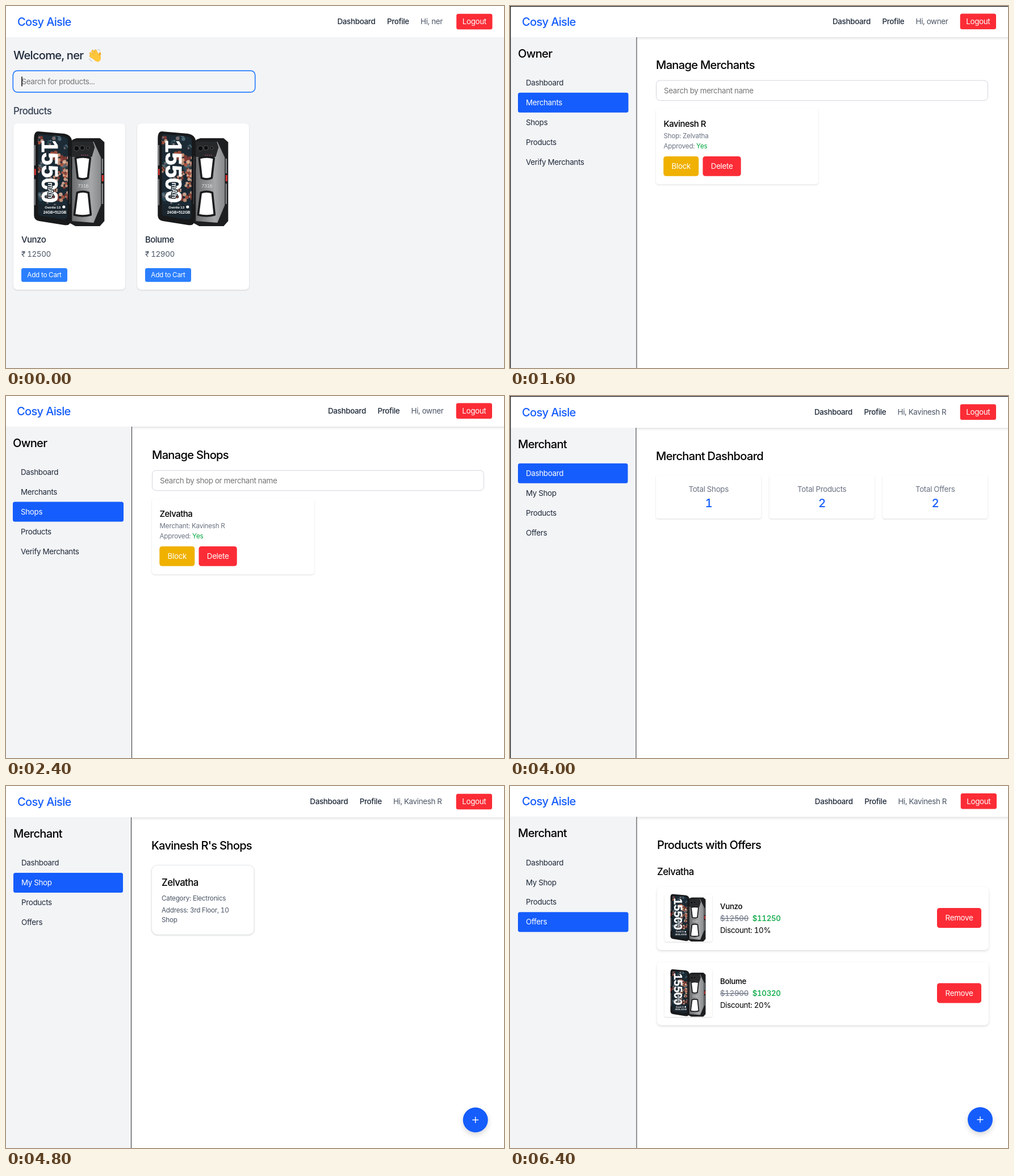
These frames come from a looping animation (877 px wide and 638 px high, 7200 ms). An HTML page:

```html
<!DOCTYPE html>
<html lang="en">
<head>
<meta charset="utf-8">
<title>Shop walkthrough</title>
<style>
  html, body { margin: 0; width: 100%; height: 100%; overflow: hidden; background: #fff; }
  svg { display: block; width: 877px; height: 638px; }
  text { font-family: Inter, system-ui; font-optical-sizing: none; font-variant-numeric: tabular-nums; white-space: pre; }
  .low { filter: drop-shadow(0 1px 1.2px rgba(0, 0, 0, .14)); }
  .mid { filter: drop-shadow(0 2px 2px rgba(0, 0, 0, .13)); }
  .high { filter: drop-shadow(0 4px 5px rgba(0, 0, 0, .16)); }
  .print { font-family: Arial, system-ui; font-weight: 700; fill: #fff; }
</style>
</head>
<body>
<svg id="stage" viewBox="0 0 877 638"></svg>
<script>
const HOLD = 800;
const BRAND = 'Cosy Aisle', SHOP = 'Zelvatha', SELLER = 'Kavinesh R';
const GOODS = [
  { name: 'Vunzo', price: 12500, offer: 11250, cut: 10, stock: 150 },
  { name: 'Bolume', price: 12900, offer: 10320, cut: 20, stock: 120 }
];
const C = {
  blue: '#155dfc', sky: '#2b7fff', red: '#fb2c36', amber: '#f0b100', green: '#00a63e',
  indigo: '#4f39f6', pale: '#f3f4f6', ink: '#1e2939', slate: '#4a5565', gray: '#6a7282',
  hint: '#757575', line: '#d1d5dc'
};
const BIG = 20.1, MID = 16.8, NAME = 15, BASE = 13.4, SMALL = 11.7;

// Text is placed by the vertical centre of its capitals.
function text(x, y, str, { size = BASE, fill = '#000', weight = 400, anchor = 'start', extra = '' } = {}) {
  const track = size > 14 ? -.035 : size > 12 ? -.025 : -.02;
  return `<text x="${x}" y="${(y + size * .364).toFixed(2)}" font-size="${size}" fill="${fill}"
    font-weight="${weight}" text-anchor="${anchor}" letter-spacing="${track}em" ${extra}>${str}</text>`;
}

function box(x, y, w, h, r, fill, extra = '') {
  return `<rect x="${x}" y="${y}" width="${w}" height="${h}" rx="${r}" fill="${fill}" ${extra}/>`;
}

const card = (x, y, w, h, r = 5, cls = 'low') => box(x, y, w, h, r, '#fff', `class="${cls}"`);
const title = (x, y, str) => text(x, y, str, { size: BIG, weight: 500 });
const span = (str, fill) => `<tspan fill="${fill}">${str}</tspan>`;

function button(x, y, w, h, label, fill, size = BASE, r = 4.5) {
  return box(x, y, w, h, r, fill) +
    text(x + w / 2, y + h / 2, label, { size, fill: '#fff', anchor: 'middle' });
}

function search(x, y, w, hint) {
  return box(x + .5, y + .5, w - 1, 35.5, 7, '#fff', `stroke="${C.line}"`) +
    text(x + 14, y + 18.3, hint, { fill: C.hint });
}

function actions(x, y, first = 'Block') {
  return button(x, y, 62, 34.7, first, C.amber) + button(x + 69.2, y, 67.2, 34.7, 'Delete', C.red);
}

const lines = (x, ys, rows, fill = C.gray) =>
  rows.map((row, i) => text(x, ys[i], row, { size: SMALL, fill })).join('');

const edge = () => '<path d="M.5 638V.5H877" fill="none" stroke="#1c1c1e" stroke-width="1.6"/>';

function plus(x, y) {
  return `<circle cx="${x}" cy="${y}" r="22" fill="${C.blue}" class="high"/>
    <path d="M${x - 5.5} ${y}h11M${x} ${y - 5.5}v11" stroke="#fff" stroke-width="1.4"/>`;
}

function header({ x, y, right, nav, user }) {
  const link = { fill: C.ink, weight: 500 };
  return box(-6, -6, 890, 60.5 + y, 0, '#fff', 'class="mid"') +
    text(21 + x, 27 + y, BRAND, { size: BIG, fill: C.blue, weight: 500 }) +
    text(nav, 26.8 + y, 'Dashboard', link) +
    text(nav + 87.4, 26.8 + y, 'Profile', link) +
    text(nav + 146.6, 26.8 + y, 'Hi, ' + user, { fill: C.slate }) +
    button(right - 63.3, 13 + y, 63.3, 27.5, 'Logout', C.red, BASE, 3.5);
}

const MENUS = {
  Owner: ['Dashboard', 'Merchants', 'Shops', 'Products', 'Verify Merchants'],
  Merchant: ['Dashboard', 'My Shop', 'Products', 'Offers']
};

function sidebar({ x, y, rule, role, active }) {
  const items = MENUS[role].map((label, i) => {
    const cy = 134.7 + y + i * 34.95, on = label === active;
    return (on ? box(14 + x, cy - 17.4, rule - 28.5 - x, 35, 3.5, C.blue) : '') +
      text(28 + x, cy, label, { fill: on ? '#fff' : C.ink });
  });
  return box(0, 54.5 + y, rule, 584, 0, C.pale) +
    `<path d="M${rule} ${54.5 + y}V638" stroke="#3a3d42" stroke-width="1.1"/>` +
    text(14 + x, 83 + y, role, { size: BIG, weight: 500 }) + items.join('');
}

const OWNER = { role: 'Owner', user: 'owner' };
const MERCHANT = { role: 'Merchant', user: SELLER };
const page = (opts, body) => header(opts) + sidebar(opts) + body;

function stats(x, y, rows) {
  return rows.map(([label, value], i) => {
    const cx = x + i % 3 * 199.5, cy = y + Math.floor(i / 3) * 90.7;
    return card(cx, cy, 185.5, 76, 4) +
      text(cx + 92.7, cy + 24, label, { fill: C.gray, anchor: 'middle' }) +
      text(cx + 92.7, cy + 49, value, { size: 20.5, fill: C.blue, weight: 500, anchor: 'middle' });
  }).join('');
}

// Overlapping round petals, warmer towards the right of the screen.
function flowers() {
  let seed = 11, out = '';
  const rnd = () => (seed = seed * 16807 % 2147483647) / 2147483647;
  const warm = ['#b5563f', '#d79a7e', '#8a3c33', '#e0b39b'], cool = ['#2f4c5a', '#54707c', '#1f333f', '#8b7a78'];
  for (let i = 0; i < 34; i++) {
    const x = 8 + rnd() * 54, y = 8 + rnd() * 134, r = 2.5 + rnd() * 3;
    const tones = rnd() * 60 < x ? warm : cool;
    for (let k = 0; k < 5; k++) {
      const a = k * 1.257 + i;
      out += `<circle cx="${(x + Math.cos(a) * r).toFixed(1)}" cy="${(y + Math.sin(a) * r).toFixed(1)}"
        r="${(r * .62).toFixed(1)}" fill="${tones[(i + k) % 4]}" opacity=".85"/>`;
    }
  }
  return out;
}

function phoneDefs() {
  const screen = 'M12 5L54 9Q61 10 61 17L60 150Q59 156 52 155L13 149Q8 148 8 143V9Q8 5 12 5Z';
  const pane = 'stroke="#1b1c1e" stroke-width="3.6" stroke-linejoin="round"';
  return `<defs>
    <clipPath id="screen"><path d="${screen}"/></clipPath>
    <linearGradient id="metal"><stop stop-color="#6c6e70"/><stop offset=".65" stop-color="#a6a8aa"/><stop offset="1" stop-color="#86888a"/></linearGradient>
    <g id="phone">
      <path d="M70 14L76 12H117L125 19V158L117 167H74L63 161V20Z" fill="#1d1e20"/>
      <path d="M68 20L106 18L119 46V130L106 161L68 158Z" fill="url(#metal)"/>
      <path d="M121.500 48V74M121.500 92V128" stroke="#8d9092" stroke-width="2.200"/>
      <path d="M67 18H105L108 28L103 45H67Z" fill="#27282a"/>
      <g fill="#0c0d0e" stroke="#505357"><circle cx="76" cy="30" r="4.500"/><circle cx="86" cy="29" r="4"/><circle cx="96" cy="29" r="2.500"/></g>
      <path d="M84 42h13" stroke="#c65c86" stroke-dasharray="2 1.500"/>
      <path d="M74 47Q87 43 100 47L96 82Q87 86 78 82Z" fill="#fff" ${pane}/>
      <path d="M77 108Q87 104 97 108L101 147Q87 151 72 147Z" fill="#fff" ${pane}/>
      <path d="M66 48V66" stroke="#151617" stroke-width="4"/>
      <text x="78" y="98.500" font-size="8" fill="#e2e3e4" letter-spacing="-.5">7316</text>
      <path d="M122 77v11" stroke="#df3434" stroke-width="3"/>
      <path d="M8 0L54 4Q67 6 68 18L66 158Q64 167 54 165L10 158Q1 156 1 148V12Q1 0 8 0Z" fill="#18191b"/>
      <path d="M2.500 24V60M2.500 84V130" stroke="#85898c" stroke-width="2.200"/>
      <path d="M65 44L64 128" stroke="#3c3f42" stroke-width="1.500"/>
      <path d="M3 66v11" stroke="#df3434" stroke-width="2.500"/>
      <g clip-path="url(#screen)"><path d="${screen}" fill="#1b2a34"/>${flowers()}
        <path d="M6 128L62 131V158L6 152Z" fill="#1a242c" opacity=".7"/></g>
      <text class="print" font-size="40" transform="translate(14.500 15) rotate(90)" stroke="#fff" stroke-width=".8">15500</text>
      <text class="print" font-size="12.500" transform="translate(26 90) rotate(90)" stroke="#1b2a34" stroke-width="2.500" paint-order="stroke">mAh</text>
      <text class="print" x="20" y="135.500" font-size="6">Ostrilo 13</text>
      <circle cx="53.500" cy="133" r="2.600" fill="#fff"/>
      <text class="print" x="17.500" y="145" font-size="6.400">24GB+512GB</text>
    </g></defs>`;
}

const phone = (x, y, k = 1) => `<use href="#phone" transform="translate(${x} ${y}) scale(${k})"/>`;

function wave(x, y) {
  const fingers = 'M10 17L4 13M11 15L4 8.500M13.500 13L7.500 4.500M17 13L12.500 4';
  return `<g transform="translate(${x} ${y})" fill="none" stroke-linecap="round">
    <path d="M20 17Q18.800 12 20.500 8.500" stroke="#f2ab2c" stroke-width="3.800"/>
    <path d="${fingers}" stroke="#e59a22" stroke-width="4.400"/>
    <path d="${fingers}" stroke="#ffca3e" stroke-width="3.400"/>
    <path d="M10 16L16 10L21 15Q21.500 21 17 22.500Q13 22.500 9 17Z" fill="#ffc73a" stroke="#ffc73a" stroke-width="2"/>
    <path d="M17 1.500Q20 2 21 4.500M1.500 18Q3 21.500 6.500 22.500" stroke="#9fb0bd" stroke-width=".9"/></g>`;
}

function home() {
  const cards = GOODS.map((g, i) => {
    const x = 13 + i * 218;
    return card(x, 207, 197, 293, 7) + phone(x + 35.3, 221) +
      text(x + 14, 412, g.name, { size: NAME, fill: C.ink, weight: 500 }) +
      text(x + 14, 437.3, '₹ ' + g.price, { fill: C.slate }) +
      button(x + 14, 462, 81, 24.3, 'Add to Cart', C.sky, SMALL, 3.5);
  });
  return header({ x: -1, y: .7, right: 856.5, nav: 583.5, user: 'ner' }) +
    box(0, 55, 877, 583, 0, C.pale) +
    text(13, 87, 'Welcome, ner', { size: BIG, fill: C.ink, weight: 500 }) + wave(145, 75) +
    box(12.3, 114.2, 426.4, 37.6, 7.5, C.pale, `stroke="${C.sky}" stroke-width="1.7"`) +
    text(27.5, 133, 'Search for products...', { fill: C.hint }) +
    '<path d="M28 124.500v17" stroke="#000" stroke-width="1.500"/>' +
    text(13, 184.5, 'Products', { size: MID, fill: '#364153', weight: 500 }) + cards.join('');
}

function ownerHome() {
  return page({ ...OWNER, x: 0, y: 0, right: 857, nav: 568.8, rule: 223, active: 'Dashboard' },
    title(259, 104, 'Owner Dashboard') +
    stats(259, 139, [['Total Merchants', 1], ['Pending Merchants', 0], ['Total Shops', 1],
      ['Total Products', 2], ['Total Offers', 2]]));
}

// One search field with a single record below it.
function record(heading, hint, name, rows) {
  return title(257, 103.7, heading) + search(257, 130.7, 585, hint) +
    card(257, 181, 286, 133.5) + text(270.5, 208, name, { size: NAME, weight: 500 }) +
    lines(270.5, [228.7, 246.5], rows) + actions(270.3, 265);
}

const approved = 'Approved: ' + span('Yes', C.green);

function merchants() {
  return page({ ...OWNER, x: 0, y: .5, right: 856, nav: 568, rule: 223, active: 'Merchants' },
    record('Manage Merchants', 'Search by merchant name', SELLER, ['Shop: ' + SHOP, approved]) + edge());
}

function shops() {
  return page({ ...OWNER, x: -2, y: -.6, right: 856, nav: 567, rule: 221.5, active: 'Shops' },
    record('Manage Shops', 'Search by shop or merchant name', SHOP, ['Merchant: ' + SELLER, approved]));
}

function goodsCards(x, y, first) {
  return GOODS.map((g, i) => {
    const cx = x + i * 298.5;
    return card(cx, y, 285, 167) + text(cx + 14, y + 26.7, g.name, { size: NAME, weight: 500 }) +
      lines(cx + 14, [47, 65, 82.3, 99.6].map(d => y + d), ['Price: ₹' + g.price, 'Offer: ₹' + g.offer,
        'Stock: ' + g.stock, 'Status: ' + span('Active', C.green)]) +
      actions(cx + 13.5, y + 118.2, first);
  }).join('');
}

function catalogue() {
  return page({ ...OWNER, x: 1.2, y: 2.2, right: 856, nav: 568.2, rule: 224, active: 'Products' },
    title(259, 106.3, 'Products by Shops') + search(259, 133.3, 583, 'Search by product or shop name') +
    text(259, 203, SHOP, { size: MID, fill: C.indigo, weight: 500 }) +
    goodsCards(259, 222, 'Block') + edge());
}

function sellerHome() {
  return page({ ...MERCHANT, x: 0, y: 1.5, right: 856, nav: 536, rule: 222, active: 'Dashboard' },
    title(257, 105.5, 'Merchant Dashboard') +
    stats(257, 140, [['Total Shops', 1], ['Total Products', 2], ['Total Offers', 2]]) + edge());
}

function myShop() {
  return page({ ...MERCHANT, x: -1, y: .8, right: 856, nav: 535.3, rule: 220.5, active: 'My Shop' },
    title(256, 105, SELLER + "'s Shops") +
    box(256.5, 139.5, 180.5, 122.5, 10, '#fff', 'stroke="#e5e7eb" class="low"') +
    text(274, 169.5, SHOP, { size: MID, weight: 500 }) +
    lines(274, [197.7, 218.7, 236.2], ['Category: Electronics', 'Address: 3rd Floor, 10', 'Shop'], C.slate) +
    plus(826.7, 588.5));
}

function myGoods() {
  return page({ ...MERCHANT, x: 0, y: 0, right: 857, nav: 536.8, rule: 223, active: 'Products' },
    title(259, 104, 'My Products') + text(259, 151, SHOP, { size: MID, weight: 500 }) +
    goodsCards(259, 178, 'Edit') + plus(828, 588));
}

function offers() {
  const rows = GOODS.map((g, i) => {
    const y = 178 + i * 132.4;
    return card(259, y, 584, 111, 7, 'mid') + card(272, y + 12.5, 84, 84, 3.5) + phone(282, y + 12.5, .5) +
      text(370, y + 33.7, g.name, { weight: 500 }) +
      text(370, y + 54.8, '$' + g.price, { fill: C.gray, extra: 'text-decoration="line-through"' }) +
      text(426.7, y + 54.8, '$' + g.offer, { fill: C.green, weight: 500 }) +
      text(370, y + 76, `Discount: ${g.cut}%`) +
      button(752, y + 37, 78, 35, 'Remove', C.red);
  });
  return page({ ...MERCHANT, x: 0, y: 0, right: 857, nav: 536.8, rule: 223, active: 'Offers' },
    title(259, 104, 'Products with Offers') + text(259, 151, SHOP, { size: MID, weight: 500 }) +
    rows.join('') + plus(828, 588));
}

const scenes = [home, ownerHome, merchants, shops, catalogue, sellerHome, myShop, myGoods, offers];
const stage = document.getElementById('stage');
stage.innerHTML = phoneDefs() + scenes.map(draw => `<g class="scene" display="none">${draw()}</g>`).join('');
const groups = [...stage.querySelectorAll('.scene')];

function render(now) {
  const current = Math.floor(now / HOLD) % scenes.length;
  groups.forEach((g, i) => g.setAttribute('display', i === current ? 'inline' : 'none'));
}

function tick() {
  render(performance.now());
  requestAnimationFrame(tick);
}
tick();
</script>
</body>
</html>
```
